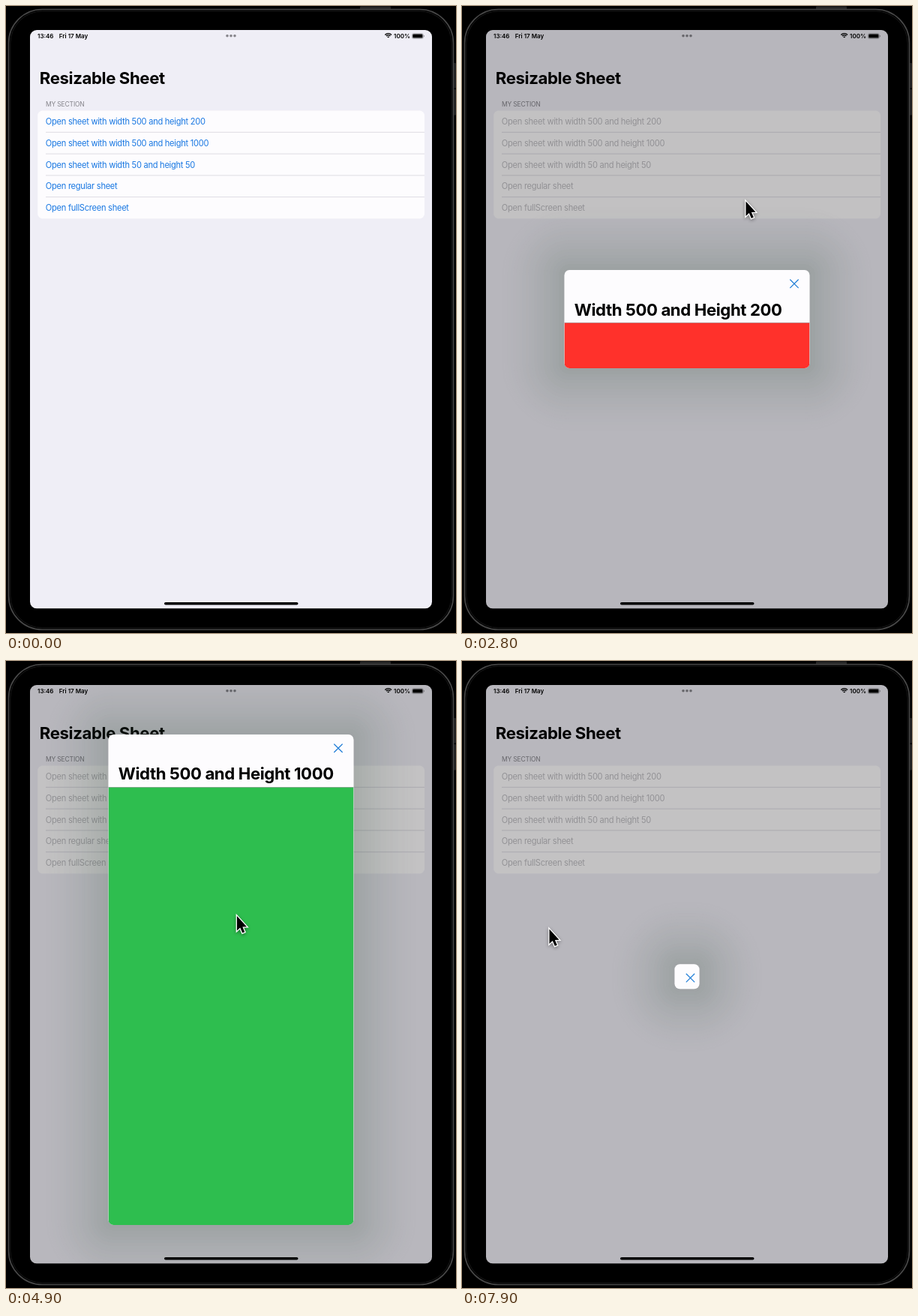
Write an HTML page with a canvas that moves like this. It is 600 by 836 pixels and loops after 8 s.

```html
<!DOCTYPE html>
<html lang="en">
<head>
<meta charset="utf-8">
<title>Resizable Sheet</title>
<style>
  html, body { margin: 0; width: 100%; height: 100%; overflow: hidden; background: #000; }
  canvas { display: block; width: 600px; height: 836px; }
</style>
</head>
<body>
<canvas id="stage" width="600" height="836"></canvas>
<script>
const ctx = document.getElementById('stage').getContext('2d');
const LOOP = 8000;
const SCREEN = { x: 32, y: 32, w: 536, h: 771.5 };
const CARD = { x: 42.2, y: 139.5, w: 515.8, h: 144 };
const ROW_H = CARD.h / 5;
const BLUE = [24, 119, 226];
const MUTED = [190, 189, 193];

const ROWS = [
  'Open sheet with width 500 and height 200',
  'Open sheet with width 500 and height 1000',
  'Open sheet with width 50 and height 50',
  'Open regular sheet',
  'Open fullScreen sheet'
];

// tap: tint fades; open and close: start of each spring
const SHEETS = [
  { tap: 850, open: 1350, close: 3280, w: 327, h: 131, title: 'Width 500 and Height 200', fill: '#ff312b' },
  { tap: 4320, open: 4450, close: 5980, w: 327, h: 654, title: 'Width 500 and Height 1000', fill: '#2ebe4f' },
  { tap: 7230, open: 7430, close: Infinity, w: 33, h: 33 }
];

const PRESSES = [
  { row: 1, from: 4230, to: 4370 },
  { row: 2, from: 7020, to: 7220 }
];

// time, x, y of the pointer tip
const POINTER = [
  [50, 523, -30], [750, 397, 152], [2330, 397, 152], [2800, 378, 260],
  [3180, 441, 367], [3420, 441, 367], [4000, 329, 181], [4380, 329, 181],
  [4950, 307, 343], [5150, 307, 343], [5850, 441, 113], [6200, 441, 113],
  [6960, 160, 205], [7440, 160, 205], [7900, 116, 357], [8000, 116, 357]
];

const clamp = v => Math.max(0, Math.min(1, v));
const mix = (a, b, p) => a + (b - a) * p;
const smooth = p => p * p * (3 - 2 * p);

function spring(ms) {
  const k = Math.max(0, ms) * 0.0146;
  return 1 - (1 + k) * Math.exp(-k);
}

function roundRect(x, y, w, h, r, fill) {
  ctx.beginPath();
  ctx.roundRect(x, y, w, h, r);
  if (fill) {
    ctx.fillStyle = fill;
    ctx.fill();
  }
}

function rect(x, y, w, h, fill) {
  ctx.fillStyle = fill;
  ctx.fillRect(x, y, w, h);
}

function text(str, x, y, size, weight, color, tracking = 0) {
  ctx.font = `${weight} ${size}px Inter, sans-serif`;
  ctx.letterSpacing = `${size * tracking}px`;
  ctx.fillStyle = color;
  ctx.fillText(str, x, y);
}

const heading = (str, x, y) => text(str, x, y, 22.2, 700, '#000', -0.018);

function drawDevice() {
  rect(0, 0, 600, 836, '#000');
  roundRect(472, 0.5, 41, 6, 1, '#262626');
  roundRect(594, 76, 6, 33.5, 1, '#1f1f1f');
  roundRect(594, 111, 6, 34.5, 1, '#1f1f1f');
  roundRect(3.5, 4.5, 593, 827, 45, '#000');
  ctx.lineWidth = 1.6;
  ctx.strokeStyle = '#484848';
  ctx.stroke();
  roundRect(5.8, 6.8, 588.4, 822.4, 43);
  ctx.lineWidth = 1;
  ctx.strokeStyle = '#191919';
  ctx.stroke();
}

function drawStatus() {
  text('13:46', 42, 42.5, 8, 600, '#000');
  text('Fri 17 May', 70.8, 42.5, 8, 600, '#000');
  text('100%', 517, 42.5, 8, 600, '#000');

  ctx.fillStyle = '#85848a';
  for (const x of [295, 300, 305]) {
    ctx.beginPath();
    ctx.arc(x, 39.8, 1.8, 0, 7);
    ctx.fill();
  }

  ctx.strokeStyle = '#000';
  ctx.lineWidth = 1.4;
  for (const r of [6.2, 3.9, 1.4]) {
    ctx.beginPath();
    ctx.arc(509.7, 42.8, r, -Math.PI * 0.75, -Math.PI * 0.25);
    ctx.stroke();
  }

  roundRect(541.4, 36.7, 15, 6.8, 2);
  ctx.strokeStyle = '#99989e';
  ctx.lineWidth = 0.7;
  ctx.stroke();
  roundRect(542.3, 37.6, 13.2, 5, 1.2, '#000');
  rect(557.2, 39, 0.8, 2.2, '#99989e');
}

function drawPage(t, muted) {
  rect(SCREEN.x, SCREEN.y, SCREEN.w, SCREEN.h, '#efeef6');
  drawStatus();
  heading('Resizable Sheet', 44.8, 104);
  text('MY SECTION', 53, 133.5, 8.5, 400, '#85848b', -0.02);
  roundRect(CARD.x, CARD.y, CARD.w, CARD.h, 6.5, '#fdfcfe');

  for (let i = 1; i < ROWS.length; i++) {
    rect(53, CARD.y + i * ROW_H - 0.5, CARD.x + CARD.w - 53, 1, '#dedde3');
  }
  for (const { row, from, to } of PRESSES) {
    if (t < from) continue;
    ctx.globalAlpha = 1 - clamp((t - to) / 100);
    rect(CARD.x, CARD.y + row * ROW_H - 0.5, CARD.w, ROW_H + 0.5, '#c8c6cc');
    ctx.globalAlpha = 1;
  }
  const tint = `rgb(${BLUE.map((c, i) => Math.round(mix(c, MUTED[i], muted)))})`;
  ROWS.forEach((label, i) => {
    text(label, 52.8, CARD.y + (i + 0.5) * ROW_H + 4.1, 11.1, 400, tint, -0.024);
  });
}

// Separate rings keep the faint colour free of rounding from stacked layers.
function drawShadow(x, y, w, h, strength) {
  const reach = 88, step = 4;
  const addOutline = d => ctx.roundRect(x - d, y - d, w + 2 * d, h + 2 * d, 7 + d);
  for (let d = 0; d < reach; d += step) {
    const alpha = 0.18 * strength * (1 - d / reach) ** 1.6;
    ctx.beginPath();
    addOutline(d);
    addOutline(d + step);
    ctx.fillStyle = `rgba(40,72,52,${alpha})`;
    ctx.fill('evenodd');
  }
}

function drawSheet({ w, h, title, fill }, p) {
  const x = 300 - w / 2;
  const y = mix(803, 417.5 - h / 2, p);
  drawShadow(x, y, w, h, p * p);

  ctx.save();
  roundRect(x, y, w, h, 7, '#fdfcfe');
  ctx.clip();
  if (title) {
    rect(x, y + 70.5, w, h, fill);
    rect(x, y + 70.2, w, 0.7, 'rgba(90,90,95,.55)');
    heading(title, 149.8, y + 60.5);
  }
  ctx.restore();

  const cx = x + w - (title ? 20.5 : 12);
  const cy = y + 18.3;
  ctx.beginPath();
  ctx.moveTo(cx - 5.3, cy - 5.3);
  ctx.lineTo(cx + 5.3, cy + 5.3);
  ctx.moveTo(cx + 5.3, cy - 5.3);
  ctx.lineTo(cx - 5.3, cy + 5.3);
  ctx.strokeStyle = '#2580d8';
  ctx.lineWidth = 1.3;
  ctx.lineCap = 'round';
  ctx.stroke();
  ctx.lineCap = 'butt';
}

function drawPointer(t) {
  const next = POINTER.findIndex(key => key[0] > t);
  if (next < 1) return;
  const [t0, x0, y0] = POINTER[next - 1];
  const [t1, x1, y1] = POINTER[next];
  const p = smooth((t - t0) / (t1 - t0));

  ctx.save();
  ctx.translate(mix(x0, x1, p) + 0.5, mix(y0, y1, p) + 0.5);
  const arrow = new Path2D('M0 0V19.5L4.3 15.5L7.3 22.5L10.3 21.2L7.4 14.4L13 14.2Z');
  ctx.shadowColor = 'rgba(0,0,0,.4)';
  ctx.shadowBlur = 4;
  ctx.shadowOffsetY = 1.5;
  ctx.strokeStyle = '#fff';
  ctx.lineWidth = 2.6;
  ctx.stroke(arrow);
  ctx.shadowColor = 'transparent';
  ctx.fillStyle = '#000';
  ctx.fill(arrow);
  ctx.restore();
}

function draw(t) {
  const sheet = SHEETS.findLast(s => t >= s.tap);
  let shown = 0, muted = 0;
  if (sheet) {
    shown = spring(t - sheet.open) * (1 - spring(t - sheet.close));
    muted = clamp((t - sheet.tap) / 80) * (1 - clamp((t - sheet.close) / 250));
  }

  drawDevice();
  ctx.save();
  roundRect(SCREEN.x, SCREEN.y, SCREEN.w, SCREEN.h, 9);
  ctx.clip();
  drawPage(t, muted);
  if (shown > 0.002) {
    rect(SCREEN.x, SCREEN.y, SCREEN.w, SCREEN.h, `rgba(0,0,0,${0.235 * shown})`);
    drawSheet(sheet, shown);
  }
  roundRect(211, 795, 178.5, 3.6, 1.8, '#000');
  ctx.restore();
  drawPointer(t);
}

function tick() {
  draw(performance.now() % LOOP);
  requestAnimationFrame(tick);
}
tick();
</script>
</body>
</html>
```
